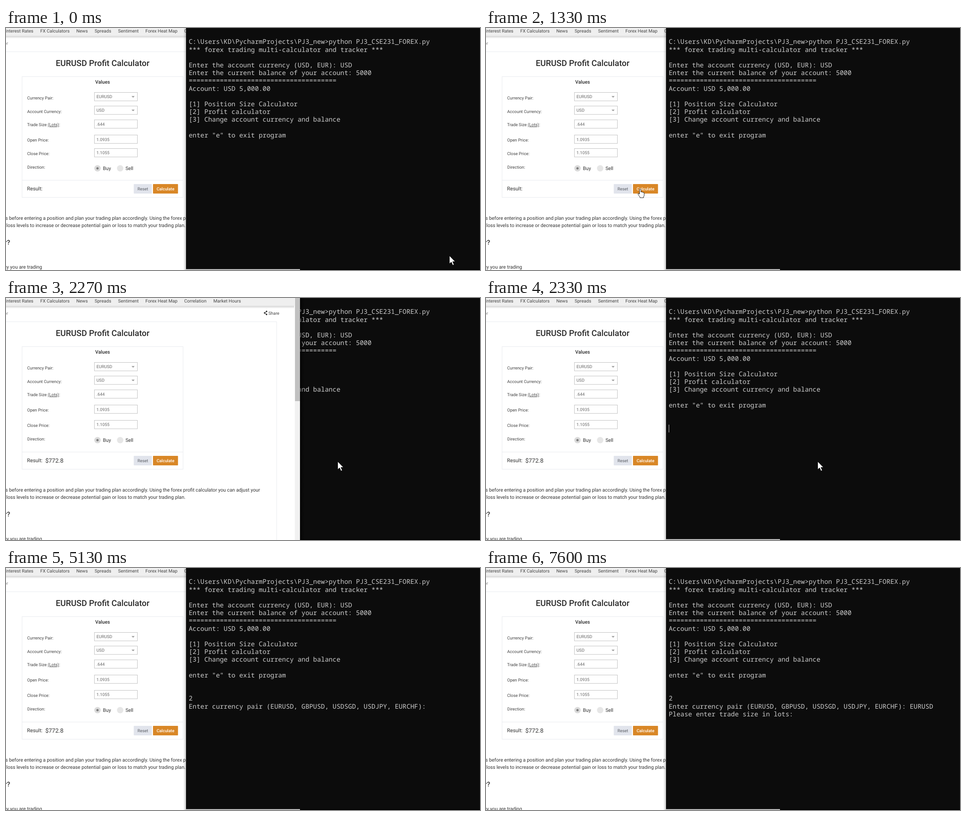
An HTML page for the animation above (8000 ms loop, 1048x535 px).

```html
<!DOCTYPE html>
<html lang="en">
<head>
<meta charset="utf-8">
<title>Profit calculator and terminal</title>
<style>
html, body { margin: 0; width: 100%; height: 100%; overflow: hidden; background: #000; }
svg { display: block; width: 1048px; height: 535px; }
text { font-family: Roboto, sans-serif; font-size: 9.38px; fill: #444; text-rendering: geometricPrecision; white-space: pre; }
.nav text { font-size: 10.05px; }
.body { font-size: 10.72px; fill: #333; }
.bold { font-weight: 500; fill: #2b2b2b; }
.val { fill: #666; }
.end { text-anchor: end; }
.mid { text-anchor: middle; }
.box { fill: #fff; stroke: #c2c2c2; }
.rule { fill: none; stroke: #e9ebef; }
#term text { font-family: "Noto Sans Mono", monospace; font-size: 14.333px; fill: #ccc; }
</style>
</head>
<body>
<svg viewBox="0 0 1048 535">
  <defs>
    <linearGradient id="down" x2="0" y2="1">
      <stop stop-color="#000" stop-opacity=".17"/><stop offset="1" stop-color="#000" stop-opacity="0"/>
    </linearGradient>
    <linearGradient id="left" x1="1" x2="0">
      <stop stop-color="#000" stop-opacity=".2"/><stop offset="1" stop-color="#000" stop-opacity="0"/>
    </linearGradient>
    <linearGradient id="right">
      <stop stop-color="#000" stop-opacity=".5"/><stop offset="1" stop-color="#000" stop-opacity="0"/>
    </linearGradient>
    <clipPath id="view"><rect id="viewRect" y="0" width="1048" height="535"/></clipPath>
  </defs>

  <g id="page">
    <rect width="650" height="535" fill="#fff"/>
    <path class="rule" d="M0 52.5H598.5V535"/>
    <rect width="638" height="17.5" fill="#efefef"/>
    <rect y="17.5" width="637" height="6" fill="url(#down)"/>
    <g class="nav" id="nav"><text class="end" x="60.5" y="9.5">Interest Rates</text></g>
    <text class="end" x="4.6" y="36.5" style="fill:#8a8a8a">or</text>
    <g fill="#333" stroke="#333">
      <path d="M576 29.7L571.9 33L576 36.3" fill="none"/>
      <circle cx="576" cy="29.7" r="1.3"/><circle cx="571.9" cy="33" r="1.3"/><circle cx="576" cy="36.3" r="1.3"/>
    </g>
    <text x="580.3" y="36.5">Share</text>
    <text class="bold mid" x="213.6" y="84" style="font-size:18.4px">EURUSD Profit Calculator</text>

    <rect class="rule" id="card" x="35.5" y="107.5" width="356" height="267"/>
    <text class="body bold mid" x="213.5" y="123.4">Values</text>
    <g id="form"></g>

    <g id="low">
      <g id="lowForm"></g>
      <text x="47" y="311.2">Direction:</text>
      <circle cx="202.3" cy="310.2" r="7" fill="#dadada"/><circle cx="202.3" cy="310.2" r="2.5" fill="#7d7d7d"/>
      <text class="body" x="214.3" y="314">Buy</text>
      <circle cx="252.4" cy="310.2" r="7" fill="#e6e6e6"/>
      <text class="body" x="264.2" y="314">Sell</text>
      <path class="rule" d="M35 336.5H392"/>
      <text class="body" x="46.4" y="359.4" style="font-size:11.4px">Result:</text>
      <text class="body" id="result" x="87" y="359.8" style="font-size:13px">$772.8</text>
      <rect x="282.5" y="345" width="40" height="21" rx="1" fill="#e1e4ec"/>
      <text class="mid" x="302.5" y="358.8" style="fill:#5c5f66">Reset</text>
      <rect x="325" y="345" width="55.3" height="21" rx="1" fill="#d98727"/>
      <text class="mid" x="352.6" y="358.8" style="fill:#fff;font-weight:500">Calculate</text>
      <text class="body" x="-1.4" y="424.4">s before entering a position and plan your trading plan accordingly. Using the forex profit calculator you can adjust your</text>
      <text class="body" x=".8" y="439.6">loss levels to increase or decrease potential gain or loss to match your trading plan.</text>
      <text class="bold end" x="9" y="479" style="font-size:14.5px">calculator?</text>
      <text class="body end" x="79.8" y="531.8">currency you are trading</text>
    </g>
    <rect x="638.5" width="11.5" height="535" fill="#f1f1f1"/>
    <rect x="639" width="11" height="228" fill="#c1c1c1"/>
  </g>

  <g id="edge">
    <rect x="392" width="6" height="535" fill="url(#left)"/>
    <rect x="398" y="533" width="252" height="2" fill="#c4c4c4"/>
  </g>
  <g id="term" clip-path="url(#view)">
    <rect x="398" width="650" height="533" fill="#0c0c0c"/>
    <g id="lines"></g>
    <rect id="caret" width="1" height="17.2" fill="#ccc"/>
  </g>
  <rect id="pageShade" x="650" width="11" height="535" fill="url(#right)"/>

  <g id="pointer" fill="#fff" stroke="#000" stroke-width=".9" stroke-linejoin="round">
    <path id="arrow" d="M.3 .3V18.2L4.6 14.6L7.6 21.5L10.6 20.2L7.6 13.6H13.2Z"/>
    <path id="hand" d="M-1.6 11V1.1Q-1.6-.4-.1-.4T1.4 1.1V6.2Q3 5.4 3.9 6.7Q5.5 6 6.3 7.4Q8.8 7 8.8 9.4V13Q8.8 15 7.4 17V19H-.6V17.4Q-3 14.5-4.8 11.4Q-5.4 9.4-3.4 9.6Z"/>
  </g>
</svg>
<script>
const LOOP = 8000, STEP = 200 / 3;
const CHAR = 8.6, LINE = 17.2, LEFT = 404, TOP = 22;
const $ = id => document.getElementById(id);

function add(parent, tag, attrs, content = "") {
  const el = document.createElementNS("http://www.w3.org/2000/svg", tag);
  for (const k in attrs) el.setAttribute(k, attrs[k]);
  el.textContent = content;
  parent.appendChild(el);
  return el;
}
const show = (id, on) => $(id).setAttribute("display", on ? "inline" : "none");

[["FX Calculators", 75.7], ["News", 155.6], ["Spreads", 196], ["Sentiment", 247.8],
 ["Forex Heat Map", 308.2], ["Correlation", 394], ["Market Hours", 458.6]]
  .forEach(([s, x]) => add($("nav"), "text", { x, y: 9.5 }, s));

function field(parent, name, value, labelY, boxY, menu) {
  const label = add(parent, "text", { x: 46.7, y: labelY }, name);
  add(parent, "rect", { class: "box", x: 195.5, y: boxY, width: 95, height: 18.6 });
  add(parent, "text", { class: "val", x: 200, y: boxY + 12.9 }, value);
  if (menu) add(parent, "path", { d: `M277.5 ${boxY + 8}h7l-3.5 3.6z`, fill: "#999" });
  return label;
}
field($("form"), "Currency Pair:", "EURUSD", 157.6, 142.5, true);
field($("form"), "Account Currency:", "USD", 187.6, 172.5, true);
const size = field($("form"), "Trade Size ", ".644", 217, 203);
add(size, "tspan", { "text-decoration": "underline" }, "(Lots)");
add(size, "tspan", {}, ":");
field($("form"), "Open Price:", "1.0935", 250.7, 236.6);
field($("lowForm"), "Close Price:", "1.1055", 280.9, 266.5);

const INTRO = [
  "C:\\Users\\KD\\PycharmProjects\\PJ3_new>python PJ3_CSE231_FOREX.py",
  "*** forex trading multi-calculator and tracker ***", "",
  "Enter the account currency (USD, EUR): USD",
  "Enter the current balance of your account: 5000",
  "=".repeat(38),
  "Account: USD 5,000.00", "",
  "[1] Position Size Calculator",
  "[2] Profit calculator",
  "[3] Change account currency and balance", "",
  "enter \"e\" to exit program", "", ""
];
const PAIR = "Enter currency pair (EURUSD, GBPUSD, USDSGD, USDJPY, EURCHF): ";
const ROWS = INTRO.concat("", "", "").map((s, i) =>
  add($("lines"), "text", { x: LEFT, y: TOP + 13.4 + i * LINE }, s));

// [time, letters typed] for the currency pair
const KEYS = [[6130, 1], [6270, 2], [6330, 3], [6530, 4], [6670, 6]];
const CARET_OFF = [[0, 2330], [2870, 3400], [3930, 4400], [5130, 5670], [7600, LOOP]];

function typed(t) {
  if (t < 4400) return [""];
  if (t < 4530) return ["2"];
  const n = KEYS.reduce((m, [at, k]) => t >= at ? k : m, 0);
  const rows = ["2", PAIR + "EURUSD".slice(0, n)];
  if (t >= 6930) rows.push("Please enter trade size in lots: ");
  return rows;
}

// [step, x, y] of the pointer tip
const PATH = [
  [0, 980, 503], [1, 800, 472], [2, 703, 455], [4, 703, 455], [6, 630, 437], [9, 430, 382],
  [12, 306, 359], [13, 290, 357], [14, 296, 357], [17, 341, 357], [20, 341, 356.2],
  [21, 342, 355.2], [24, 344, 356], [27, 440, 362], [30, 645, 364], [32, 712, 362],
  [34, 733, 361], [37, 733, 361], [38, 737, 352], [39, 740, 345]
];
function pointerAt(n) {
  const i = PATH.findIndex(p => p[0] > n);
  if (i < 0) return PATH[PATH.length - 1].slice(1);
  const [a, ax, ay] = PATH[i - 1], [b, bx, by] = PATH[i];
  const k = (n - a) / (b - a);
  return [ax + (bx - ax) * k, ay + (by - ay) * k];
}

function draw(t) {
  const n = Math.floor((t + 5) / STEP);
  const pageFront = t >= 1400 && t < 2330;
  const done = t >= 1600;

  show("result", done);
  $("low").setAttribute("transform", `translate(0 ${done ? 4 : 0})`);
  $("card").setAttribute("height", done ? 271 : 267);

  $("viewRect").setAttribute("x", pageFront ? 650 : 398);
  show("edge", !pageFront);
  show("pageShade", pageFront);

  const rows = typed(t);
  for (let i = 0; i < 3; i++) ROWS[15 + i].textContent = rows[i] || "";
  const last = rows.length - 1;
  $("caret").setAttribute("x", Math.floor(LEFT + rows[last].length * CHAR));
  $("caret").setAttribute("y", TOP + (15 + last) * LINE);
  show("caret", !CARET_OFF.some(([a, b]) => t >= a && t < b));

  const [x, y] = pointerAt(n);
  const over = x > 282 && x < 380 && y > 345 && y < 370;
  $("pointer").setAttribute("transform", `translate(${x} ${y})`);
  show("pointer", t < 4400);
  show("arrow", !over);
  show("hand", over);
}

const start = performance.now();
function tick() {
  draw((performance.now() - start) % LOOP);
  requestAnimationFrame(tick);
}
tick();
</script>
</body>
</html>
```
